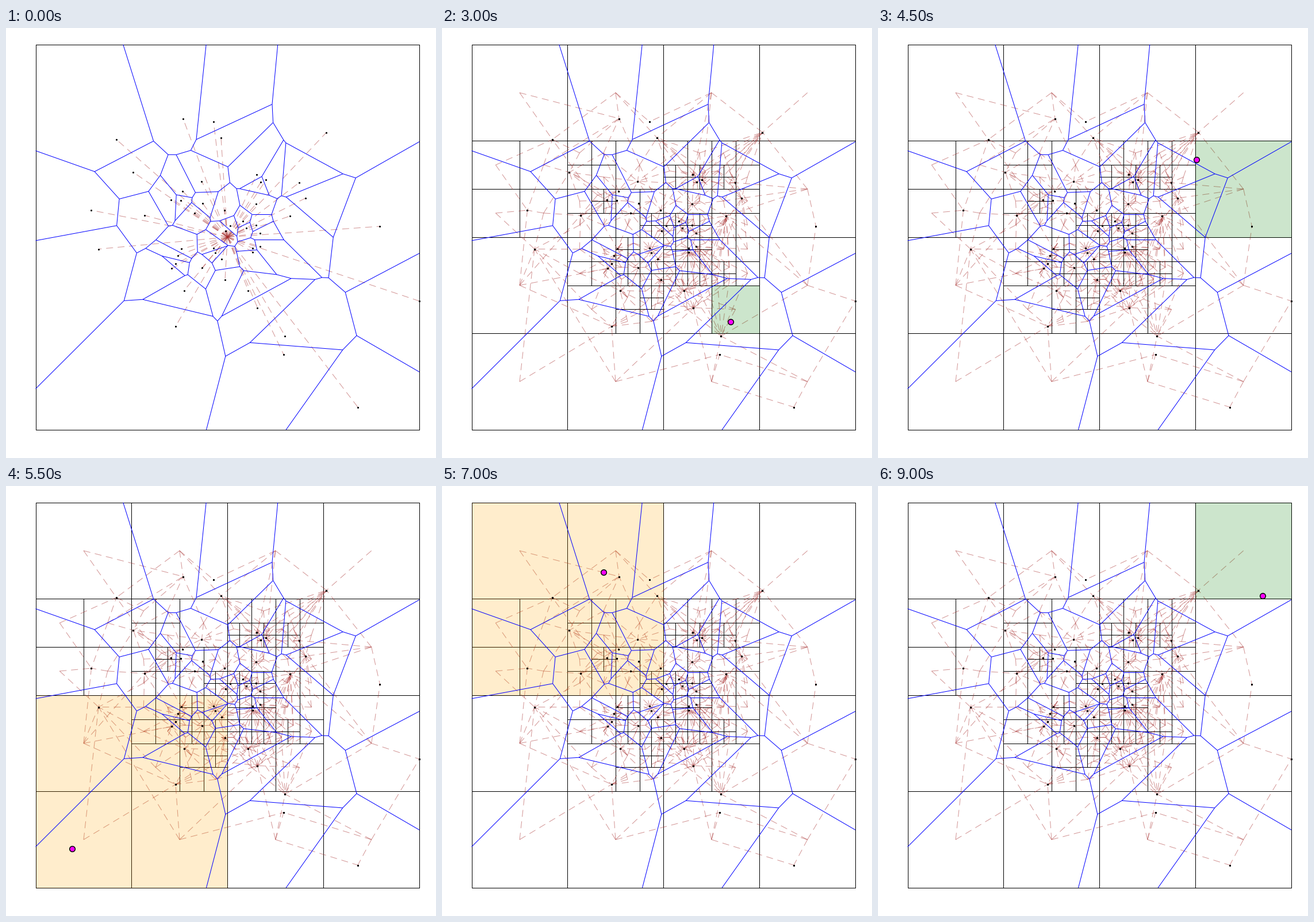
These frames come from a looping animation (748x748 px, 9.5 s). A matplotlib script:

```python
import numpy as np
import matplotlib.pyplot as plt
from matplotlib.animation import FuncAnimation
from matplotlib.collections import LineCollection
from matplotlib.patches import Rectangle

SIZE, DPI = 748, 100
PX = 72 / DPI
X0, Y0, X1, Y1 = 51.6, 28.8, 719.1, 698.9
MAX_DEPTH, CAPACITY = 5, 5

SITES = np.array([
    (308, 157.5), (361, 163), (374, 191), (192, 194), (221.5, 251),
    (557.5, 181.5), (436.2, 254.5), (443.5, 267.8), (452.5, 264.2), (510, 269),
    (340.5, 266.5), (307, 283.5), (287.5, 299.4), (304, 300.2), (342, 305),
    (328, 322), (380, 317), (435, 306), (521, 296), (494.5, 327),
    (241, 326), (148.5, 317), (161, 384.5), (650.5, 345), (719, 475),
    (612, 659.5), (483, 568), (485.5, 536), (437.5, 486.5), (421.5, 457),
    (381, 437.5), (295, 519), (310, 456.5), (341.5, 417), (375.5, 401.5),
    (363.8, 390.8), (361, 382.5), (304.9, 384.3), (299, 395.6), (295.5, 410.1),
    (288.4, 418.4), (412.5, 336), (435, 342.5), (418, 348), (442, 356.5),
    (442, 380), (429, 383), (429.5, 390), (390, 344), (382, 353),
])
QUERIES = [(502.5, 510.5), (554.5, 229), (115.5, 630.5), (281, 149.5), (669, 191)]


def voronoi_cell(i):
    """Clip the box by every bisector; each vertex keeps the neighbour across its edge."""
    poly = [(np.array(p), -1) for p in ((X0, Y0), (X1, Y0), (X1, Y1), (X0, Y1))]
    for j, other in enumerate(SITES):
        if j == i:
            continue
        normal, mid = other - SITES[i], (other + SITES[i]) / 2
        side = [normal @ (p - mid) for p, _ in poly]
        kept = []
        for k, (p, label) in enumerate(poly):
            n = (k + 1) % len(poly)
            a, b = side[k], side[n]
            if a <= 0:
                kept.append((p, label))
            if (a <= 0) != (b <= 0):
                cut = p + (poly[n][0] - p) * a / (a - b)
                kept.append((cut, j if a <= 0 else label))
        poly = kept
    return poly


def quad_box(key):
    depth, col, row = key
    w, h = (X1 - X0) / 2**depth, (Y1 - Y0) / 2**depth
    return X0 + col * w, Y0 + row * h, w, h


def quad_at(point, depth):
    n = 2**depth
    return (depth, int((point[0] - X0) / (X1 - X0) * n),
            int((point[1] - Y0) / (Y1 - Y0) * n))


cells = [voronoi_cell(i) for i in range(len(SITES))]
edges = [(p, cell[(k + 1) % len(cell)][0])
         for i, cell in enumerate(cells)
         for k, (p, j) in enumerate(cell) if j > i]
lows = np.array([np.min([p for p, _ in c], axis=0) for c in cells])
highs = np.array([np.max([p for p, _ in c], axis=0) for c in cells])


def candidates(key):
    """Sites whose cell bounds overlap the quad."""
    x, y, w, h = quad_box(key)
    hit = ((lows[:, 0] < x + w) & (highs[:, 0] > x) &
           (lows[:, 1] < y + h) & (highs[:, 1] > y))
    return np.flatnonzero(hit)


def build(limit, key=(0, 0, 0)):
    found = candidates(key)
    depth, col, row = key
    if depth == limit or len(found) <= CAPACITY:
        return {key: found}
    leaves = {}
    for dx in (0, 1):
        for dy in (0, 1):
            leaves.update(build(limit, (depth + 1, 2 * col + dx, 2 * row + dy)))
    return leaves


def outline(key):
    x, y, w, h = quad_box(key)
    return [(x, y), (x + w, y), (x + w, y + h), (x, y + h), (x, y)]


def link_lines(leaves):
    lines = []
    for key, found in leaves.items():
        x, y, w, h = quad_box(key)
        lines += [((x + w / 2, y + h / 2), tuple(SITES[s])) for s in found]
    return lines


def locate(point, leaves):
    """Binary search over depth, giving each probed quad and its colour."""
    lo, hi = 1, MAX_DEPTH
    while lo <= hi:
        mid = (lo + hi) // 2
        key = quad_at(point, mid)
        if key in leaves:
            yield key, "green"
            return
        _, col, row = key
        shallower = any((d, col >> (mid - d), row >> (mid - d)) in leaves
                        for d in range(mid))
        if shallower:
            yield key, "red"
            hi = mid - 1
        else:
            yield key, "orange"
            lo = mid + 1


trees = [build(d) for d in range(MAX_DEPTH + 1)]
steps = [(tree, None, None, None) for tree in trees]
for q in QUERIES:
    steps += [(trees[-1], q, key, color) for key, color in locate(q, trees[-1])]

fig = plt.figure(figsize=(SIZE / DPI, SIZE / DPI), dpi=DPI, facecolor="white")
ax = fig.add_axes([0, 0, 1, 1])
ax.set(xlim=(0, SIZE), ylim=(SIZE, 0))
ax.axis("off")

grid = LineCollection([], colors="black", linewidths=PX, zorder=1)
grid.set_snap(True)
links = LineCollection([], colors="brown", alpha=0.5, linewidths=PX,
                       linestyles=[(0, (12, 8))], zorder=1.5)
for lines in (grid, links,
              LineCollection(edges, colors="blue", linewidths=PX, zorder=3)):
    ax.add_collection(lines, autolim=False)
probe = ax.add_patch(Rectangle((0, 0), 1, 1, lw=PX, zorder=2))
dots = ax.scatter([], [], s=(3.1 * PX)**2, c="black", linewidths=0, zorder=4)
marker, = ax.plot([], [], "o", ms=9.6 * PX, mfc="magenta", mec="black",
                  mew=1.5 * PX, zorder=5)


def draw(i):
    tree, point, key, color = steps[i % len(steps)]
    lines = link_lines(tree)
    grid.set_segments([outline(k) for k in tree])
    links.set_segments(lines)
    dots.set_offsets([end for _, end in lines])
    probe.set_visible(key is not None)
    marker.set_visible(key is not None)
    if key is not None:
        x, y, w, h = quad_box(key)
        probe.set_bounds(x, y, w, h)
        probe.set_facecolor((color, 0.2))
        probe.set_edgecolor(("black", 0.2))
        marker.set_data([point[0]], [point[1]])
    return grid, links, probe, dots, marker


anim = FuncAnimation(fig, draw, frames=19, interval=500, repeat=True,
                     repeat_delay=0, blit=False)
plt.show()
```
